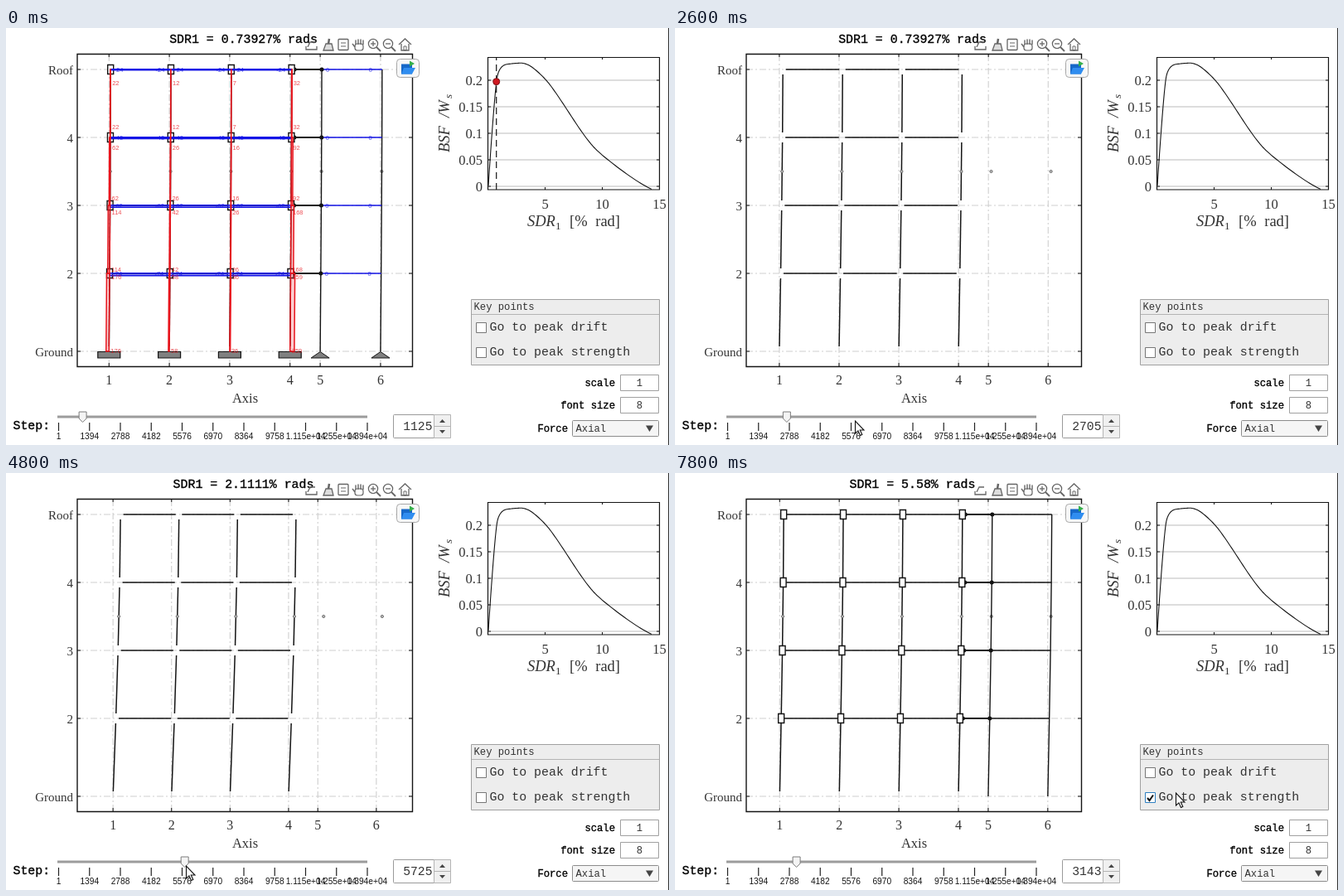
Write an HTML page with a canvas that moves like this. It is 800 px wide and 503 px high and loops after 8000 ms.

```html
<!DOCTYPE html>
<html lang="en">
<head>
<meta charset="utf-8">
<title>Frame response viewer</title>
<style>
  html, body { margin: 0; width: 100%; height: 100%; overflow: hidden; background: #fff; }
  canvas { display: block; width: 800px; height: 503px; }
</style>
</head>
<body>
<canvas id="stage" width="800" height="503"></canvas>
<script>
const ctx = document.getElementById('stage').getContext('2d');
const LOOP = 8000;
const SERIF = '"Liberation Serif", serif';
const MONO = '"Liberation Mono", monospace';
const SANS = '"Liberation Sans", sans-serif';
const INK = '#141414', SOFT = '#333', RED = '#e8141c', BLUE = '#1414e6';

const LEVELS = [50, 132, 214, 296, 390];          // roof to ground
const NAMES = ['Roof', '4', '3', '2', 'Ground'];
const AXES = [0, 1, 2, 3, 3.5, 4.5];              // in bay widths

// Each run clears the plot at start and redraws it; unit sets its pace.
const RUNS = [
  { start: -2000, unit: 200, step: 1125, drift: .73927, base: [176, 58, 36, 259] },
  { start: 1800, unit: 200, step: 2705, drift: 2.1111, base: [178, 54, 41, 301] },
  { start: 3600, unit: 300, step: 5725, drift: 5.58, base: [181, 47, 47, 281] },
  { start: 6400, unit: 250, step: 3143, drift: 2.5, base: [] }
];
const DUE = { columns: 1.3, beams: 3.9, nodes: 5.5, forces: 6.5, title: 7, marker: 8 };

const CURSOR = [
  [1400, 93, 470], [1800, 135, 470], [1900, 135, 470], [2600, 217, 474],
  [4900, 217, 474], [5500, 606, 395], [6000, 604, 386]
];

const ease = k => { k = Math.min(1, Math.max(0, k)); return k * k * (3 - 2 * k); };
const mix = (a, b, k) => a + (b - a) * k;

function line(points, color = INK, width = 1, dash = []) {
  ctx.beginPath();
  points.forEach(([x, y]) => ctx.lineTo(x, y));
  ctx.setLineDash(dash);
  paint(null, color, width);
  ctx.setLineDash([]);
}

function shape(points, fill, color, width) {
  ctx.beginPath();
  points.forEach(([x, y]) => ctx.lineTo(x, y));
  ctx.closePath();
  paint(fill, color, width);
}

function paint(fill, color, width = 1) {
  if (fill) { ctx.fillStyle = fill; ctx.fill(); }
  if (color) { ctx.strokeStyle = color; ctx.lineWidth = width; ctx.stroke(); }
}

function box(x, y, w, h, fill, color, width, radius = 0) {
  ctx.beginPath();
  ctx.roundRect(x, y, w, h, radius);
  paint(fill, color, width);
}

function dot(x, y, r, fill, color, width) {
  ctx.beginPath();
  ctx.arc(x, y, r, 0, 7);
  paint(fill, color, width);
}

function text(str, x, y, font, align = 'left', color = SOFT) {
  ctx.font = font;
  ctx.textAlign = align;
  ctx.fillStyle = color;
  ctx.fillText(str, x, y);
}

function heavy(str, x, y, font, align) {
  text(str, x, y, font, align, '#000');
  ctx.strokeStyle = '#000';
  ctx.lineWidth = .35;
  ctx.strokeText(str, x, y);
}

// The axes shrink and shift as the sway grows.
function layout(run) {
  const sway = 2.4 * run.drift ** .77;
  const ticks = AXES.map(a => 123 + .68 * sway + a * (73.4 - .31 * sway));
  const offset = LEVELS.map(y => sway * Math.sin(1.4 * (390 - y) / 340) / Math.sin(1.4));
  return { ticks, at: (col, lvl) => ticks[col] + offset[lvl] };
}

function drawAxes(ticks) {
  const dash = [8, 3, 2, 3];
  LEVELS.forEach(y => line([[86, y], [490, y]], '#cfcfcf', 1.1, dash));
  ticks.forEach(x => line([[x, 408], [x, 31]], '#cfcfcf', 1.1, dash));
  box(86, 31.5, 404.5, 377, null, INK, 1.4);
  LEVELS.forEach((y, i) => {
    line([[86, y], [90, y]]);
    line([[486, y], [490, y]]);
    text(NAMES[i], 81, y + 5.5, '15px ' + SERIF, 'right');
  });
  ticks.forEach((x, i) => {
    line([[x, 408], [x, 404]]);
    line([[x, 31], [x, 35]]);
    text(i + 1, x, 430, '16px ' + SERIF, 'center');
  });
  text('Axis', 288.5, 452, '16.5px ' + SERIF, 'center');
}

function drawFrame({ ticks, at }, run, phase) {
  const storeys = LEVELS.slice(0, 4);
  const forces = phase >= DUE.forces;

  if (phase >= DUE.columns) for (let c = 0; c < 4; c++) storeys.forEach((y0, l) => {
    const y1 = LEVELS[l + 1], gap = 6 / (y1 - y0);
    const end = k => [mix(at(c, l), at(c, l + 1), k), mix(y0, y1, k)];
    line([end(gap), end(1 - gap)], INK, 1.5);
  });

  if (phase >= DUE.beams) {
    for (let c = 0; c < 3; c++) storeys.forEach((y, l) =>
      line([[at(c, l) + 3.5, y], [at(c + 1, l) - 4, y]], INK, 1.5));
    ticks.forEach((_, c) => dot((at(c, 1) + at(c, 2)) / 2, 173, 1.6, '#bbb', '#666', .9));
  }

  if (phase >= DUE.nodes) {
    for (const c of [4, 5]) line(LEVELS.map((y, l) => [at(c, l), y]), INK, 1.4);
    storeys.forEach((y, l) => {
      line([[at(4, l), y], [at(5, l), y]], forces ? BLUE : INK, 1.4);
      line([[at(3, l) + 3, y], [at(4, l), y]], INK, 2);
      dot(at(3, l) + 3.5, y, 2.5, INK);
      dot(at(4, l), y, 2.5, INK);
      for (let c = 0; c < 4; c++) box(at(c, l) - 3.5, y - 5.5, 7, 11, '#fff', INK, 1.4);
    });
  }
  if (forces) drawForces(ticks, at, run, storeys);
}

function drawForces(ticks, at, run, storeys) {
  const label = (v, x, y, align, color) => {
    ctx.globalAlpha = .75;
    text(v, x, y, '7.5px ' + SANS, align, color);
    ctx.globalAlpha = 1;
  };

  ticks.forEach((x, c) => c < 4
    ? box(x - 13.5, 390.5, 27, 7.5, '#808080', INK, 1.2)
    : shape([[x, 390.5], [x + 11, 398], [x - 11, 398]], '#808080', INK));

  // beams grow from the roof down to a common limit
  storeys.forEach((y, l) => {
    const v = Math.round(Math.min(74, 26 * run.drift ** .32 + 19 * l));
    box(at(0, l), y - .3, at(3, l) - at(0, l), v * .04, 'rgba(60,60,255,.4)', BLUE, 1.6);
    for (let c = 0; c < 3; c++) {
      label(v, at(c, l) + 11, y + 3, 'center', BLUE);
      label(-v, at(c + 1, l) - 13, y + 3, 'center', BLUE);
    }
    label(0, at(4, l) + 7, y + 2.5, 'center', BLUE);
    label(0, at(5, l) - 14, y + 2.5, 'center', BLUE);
  });

  // columns gather load downwards, faster in the outer lines
  run.base.forEach((base, c) => storeys.forEach((y0, l) => {
    const v = Math.round(base * ((l + 1) / 4) ** (c % 3 ? 1.15 : 1.5));
    const a = at(c, l), b = at(c, l + 1), y1 = LEVELS[l + 1];
    const d = v * .02 * (c < 2 ? -1 : 1);
    shape([[a, y0], [b, y1], [b + d, y1], [a + d, y0]], 'rgba(240,30,40,.22)', RED, 1.5);
    label(v, a + 2, y0 + 19 - 4 * l, 'left', RED);
    label(v, b + 2, y1 - 10 + 4 * l, 'left', RED);
  }));
}

// Quadratic spline sampled through the midpoints of its control points.
function spline(points, n = 12) {
  const mid = (p, q) => [(p[0] + q[0]) / 2, (p[1] + q[1]) / 2];
  const last = points.length - 2, out = [];
  for (let i = 1; i <= last; i++) {
    const a = i === 1 ? points[0] : mid(points[i - 1], points[i]);
    const b = i === last ? points[i + 1] : mid(points[i], points[i + 1]);
    for (let j = 0; j <= n; j++) {
      out.push([0, 1].map(k => mix(mix(a[k], points[i][k], j / n), mix(points[i][k], b[k], j / n), j / n)));
    }
  }
  return out;
}
const CURVE = spline([[582, 190], [590, 70], [596, 45], [613, 42.5], [629, 42], [650, 60],
  [665, 80], [700, 134], [719, 154], [765, 188], [779, 194.5]]);

function drawCurve(drift) {
  const font = '16.5px ' + SERIF, big = '18.5px ' + SERIF;
  const px = v => 581.5 + v * 13.8;
  for (let i = 0; i < 5; i++) {
    const y = 191 - 32 * i;
    line([[582, y], [788, y]], '#d2d2d2', 1.3);
    line([[582, y], [585, y]]);
    line([[785, y], [788, y]]);
    text(i * 5 / 100, 575, y + 5.5, font, 'right');
  }
  for (const v of [5, 10, 15]) {
    line([[px(v), 195], [px(v), 192]]);
    line([[px(v), 35], [px(v), 38]]);
    text(v, px(v), 218, font, 'center');
  }
  box(581.5, 35.5, 207, 159.5, null, INK, 1.2);
  line(CURVE, INK, 1.1);

  text('SDR', 629, 239, 'italic ' + big);
  text('1', 663, 243, '13px ' + SERIF);
  text('[%', 680, 239, big);
  text('rad]', 741, 239, big, 'right');
  ctx.save();
  ctx.translate(535, 150);
  ctx.rotate(-Math.PI / 2);
  text('BSF', 0, 0, 'italic ' + big);
  text('/W', 42, 0, 'italic ' + big);
  text('s', 65, 3, 'italic 13px ' + SERIF);
  ctx.restore();

  if (drift) {
    const x = px(drift);
    line([[x, 195], [x, 35]], INK, 1.2, [8, 5]);
    dot(x, CURVE.find(p => p[0] >= x)[1], 4, '#d01820', '#7a1015');
  }
}

function drawToolbar() {
  const g = '#666';
  // export
  line([[362, 22], [362, 26], [375, 26], [375, 22]], g, 1.3);
  line([[364, 23], [367, 17], [373, 17]], g, 1.3);
  // brush
  line([[390, 13], [389, 19]], g, 2.5);
  shape([[386, 19], [393, 19], [395, 27], [383, 27]], '#ddd', g, 1.3);
  // data tip
  box(401, 13.5, 12, 13, null, g, 1.3, 1);
  for (const y of [18, 22]) line([[404, y], [410, y]], g);
  // hand
  box(421, 19, 10, 8, null, g, 1.2, 3);
  for (let i = 0; i < 4; i++) line([[422 + 3 * i, 20], [422 + 3 * i, 13 + Math.abs(i - 1.5)]], g, 1.4);
  line([[421, 23], [418, 19]], g, 1.4);
  // zoom in and out
  [443, 461].forEach((x, i) => {
    dot(x, 19, 5.6, '#fff', g, 1.3);
    line([[x + 4, 23], [x + 9, 28]], g, 1.8);
    line([[x - 3, 19], [x + 3, 19]], g, 1.3);
    if (!i) line([[x, 16], [x, 22]], g, 1.3);
  });
  // home
  line([[474, 20], [481.5, 13], [489, 20]], g, 1.3);
  line([[477, 19], [477, 27], [486, 27], [486, 19]], g, 1.3);
  box(480, 22, 3, 5, null, g);

  // open button
  box(471.5, 37.5, 27, 22, '#f7f7f7', '#a8a8a8', 1, 4);
  box(477, 43.5, 13, 12, '#1668c8');
  shape([[480, 48], [494, 48], [490, 55.5], [477, 55.5]], '#2f8df0');
  shape([[487, 39.5], [493, 43], [487, 46.5]], '#35b04a');
}

function drawCheck(y, label, on) {
  box(567.5, y + .5, 12, 12, '#fff', on ? '#2f7fc0' : '#777');
  if (on) line([[570, y + 7], [572.5, y + 10], [577, y + 3.5]], INK, 2);
  text(label, 583.5, y + 9.5, '14.9px ' + MONO);
}

function drawPanel(checked) {
  const font = '12.2px ' + MONO;
  box(561.5, 327.5, 227, 79, '#ededed', '#a0a0a0');
  line([[562, 345.5], [788, 345.5]], '#b4b4b4');
  text('Key points', 564.5, 340, font);
  drawCheck(355, 'Go to peak drift', false);
  drawCheck(385, 'Go to peak strength', checked);

  [['scale', 1], ['font size', 8]].forEach(([name, value], i) => {
    const y = 418.5 + 27 * i;
    heavy(name, 735, y + 13, font, 'right');
    box(741.5, y, 46, 19, '#fff', '#a0a0a0');
    text(value, 764.5, y + 13.5, font, 'center');
  });
  heavy('Force', 678, 487, font, 'right');
  box(683.5, 473.5, 104, 19, '#f5f5f5', '#8c8c8c', 1, 1);
  text('Axial', 687.5, 487, font);
  shape([[772, 479.5], [781, 479.5], [776.5, 487]], '#444');
}

function drawSlider(value, step) {
  heavy('Step:', 8.5, 484, '14.9px ' + MONO);
  box(62, 467.5, 374, 3, '#9c9c9c');
  for (let i = 0; i <= 10; i++) {
    const x = 63.5 + 37.25 * i;
    const n = i ? 1394 * i : 1;
    const label = n < 1e4 ? n : (n / 1e4).toFixed(3) + 'e+04';
    line([[x, 476], [x, 486]], '#222', 1.2);
    text(label, x, 496, '10.2px ' + SANS, 'center', INK);
  }
  const x = 62.5 + value / 13940 * 373;
  shape([[x - 4.5, 463], [x + 4.5, 463], [x + 4.5, 471], [x, 475.5], [x - 4.5, 471]], '#f4f4f4', '#7d7d7d');

  box(467.5, 466.5, 69, 28, '#fff', '#9a9a9a', 1, 1);
  box(516.5, 466.5, 20, 28, '#f0f0f0', '#b4b4b4');
  line([[517, 480.5], [536, 480.5]], '#b4b4b4');
  for (const dir of [-1, 1]) {
    const y = 480.5 + 4.5 * dir;
    shape([[523, y], [530, y], [526.5, y + 4 * dir]], '#444');
  }
  text(step, 514.5, 485, '14.7px ' + MONO, 'right');
}

function drawCursor(t) {
  if (t < 1200) return;
  const next = CURSOR.findIndex(p => p[0] > t);
  const b = CURSOR.at(next), a = next > 0 ? CURSOR[next - 1] : b;
  const k = ease((t - a[0]) / (b[0] - a[0] || 1));
  ctx.save();
  ctx.translate(mix(a[1], b[1], k), mix(a[2], b[2], k));
  shape([[.5, 0], [.5, 15], [4, 11.8], [6.5, 17.5], [8.8, 16.5], [6.3, 11], [11, 11]], '#fff', '#111', 1.1);
  ctx.restore();
}

function draw(t) {
  const i = RUNS.findLastIndex(r => r.start <= t);
  const run = RUNS[i], phase = (t - run.start) / run.unit;
  const plan = layout(run);
  const shown = phase >= DUE.title ? run : RUNS[i - 1];
  const value = i ? run.step : mix(run.step, RUNS[1].step, ease((t - 1400) / 400));

  ctx.fillStyle = '#fff';
  ctx.fillRect(0, 0, 800, 503);
  line([[799.5, 0], [799.5, 503]], SOFT);
  drawAxes(plan.ticks);
  drawFrame(plan, run, phase);
  heavy(`SDR1 = ${shown.drift}% rads`, 286.5, 18, '14.9px ' + MONO, 'center');
  drawToolbar();
  drawCurve(phase >= DUE.marker && run.drift);
  drawPanel(i === RUNS.length - 1);
  drawSlider(value, run.step);
  drawCursor(t);
}

function tick() {
  draw(performance.now() % LOOP);
  requestAnimationFrame(tick);
}
tick();
</script>
</body>
</html>
```
